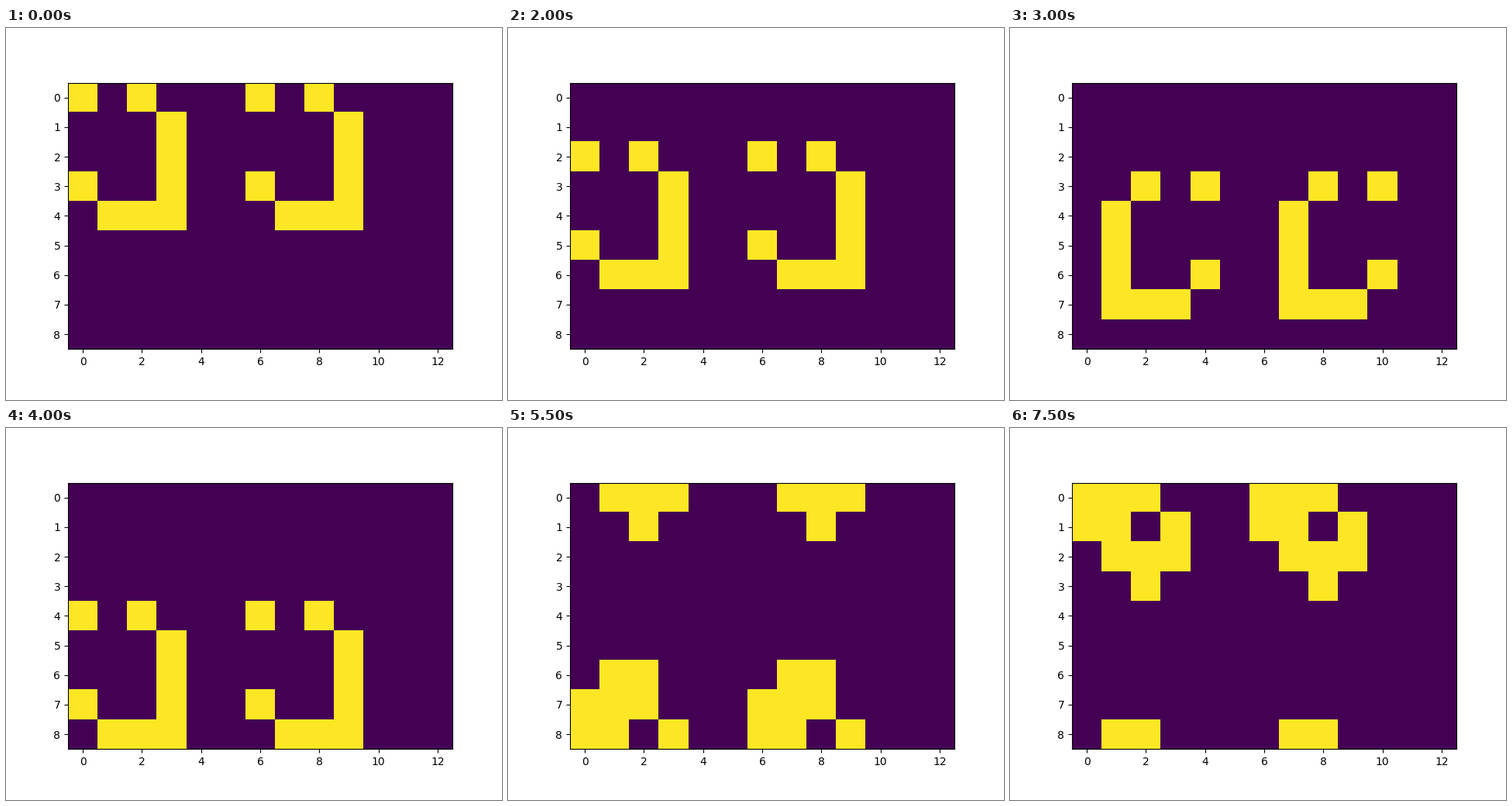
A matplotlib script for the animation above (8000 ms loop, 640 px wide and 480 px high).

```python
import matplotlib.pyplot as plt
import numpy as np
from matplotlib.animation import FuncAnimation

ROWS, COLS = 9, 13
STEPS = 16
SHIP = ["X.X.",
        "...X",
        "...X",
        "X..X",
        ".XXX"]


def start():
    ship = np.array([[c == "X" for c in row] for row in SHIP], dtype=int)
    grid = np.zeros((ROWS, COLS), dtype=int)
    h, w = ship.shape
    for x in (0, 6):
        grid[:h, x:x + w] = ship
    return grid


def evolve(grid):
    """One Game of Life generation on a torus."""
    near = sum(np.roll(grid, (dy, dx), axis=(0, 1))
               for dy in (-1, 0, 1) for dx in (-1, 0, 1) if dy or dx)
    return ((near == 3) | ((grid == 1) & (near == 2))).astype(int)


grids = [start()]
while len(grids) < STEPS:
    grids.append(evolve(grids[-1]))

fig, ax = plt.subplots(figsize=(6.4, 4.8), dpi=100)
image = ax.imshow(grids[0], cmap="viridis", vmin=0, vmax=1)


def update(i):
    image.set_data(grids[i % STEPS])
    return [image]


anim = FuncAnimation(fig, update, frames=STEPS, interval=500,
                     repeat=True, repeat_delay=0)
plt.show()
```
